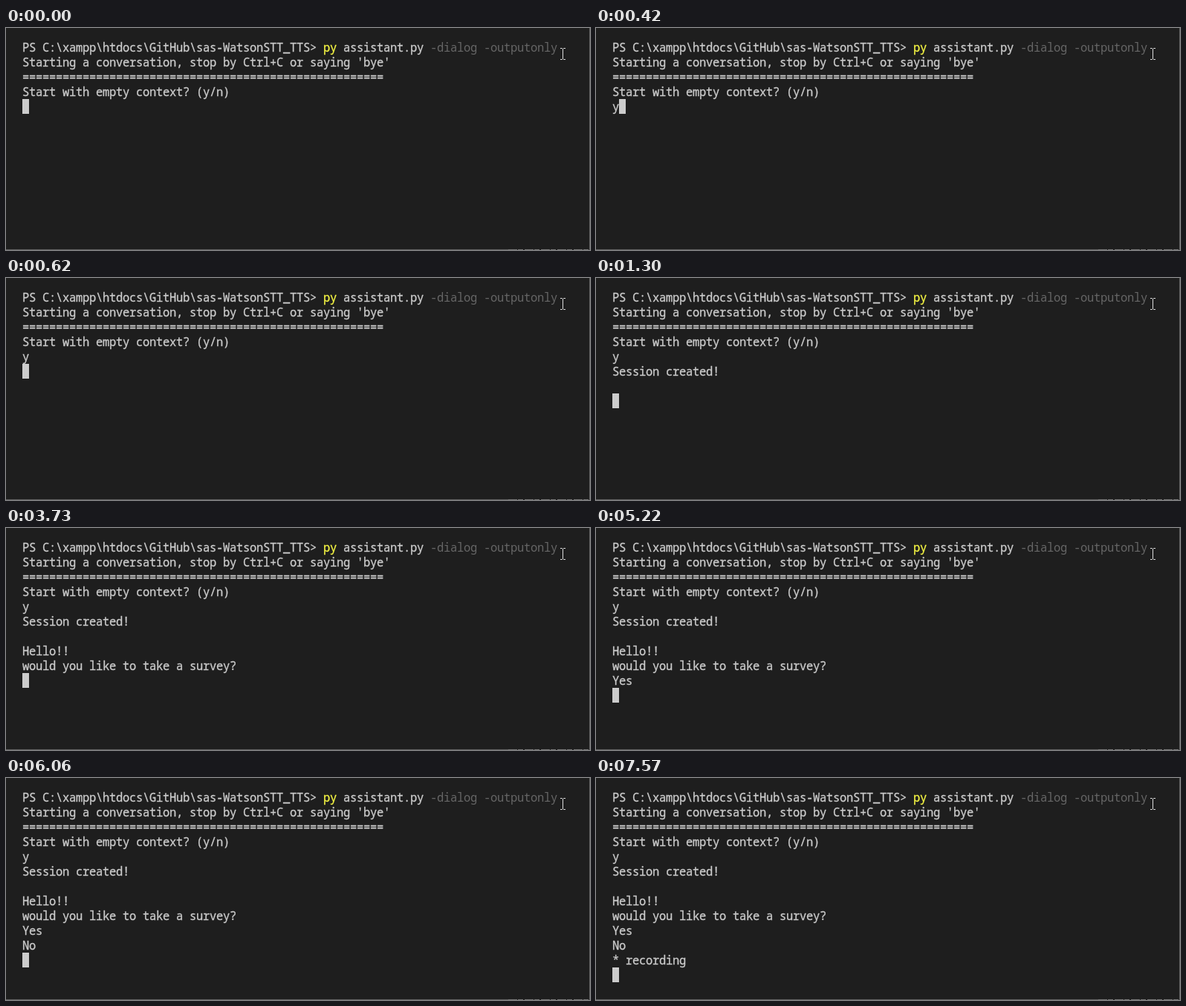
These frames come from a looping animation (786x300 px, 8000 ms). An HTML page:

```html
<!DOCTYPE html>
<html lang="en">
<meta charset="utf-8">
<title>Terminal session</title>
<style>
  html, body { margin: 0; width: 100%; height: 100%; overflow: hidden; background: #1e1e1e; }
  #stage { position: relative; width: 786px; height: 300px; overflow: hidden; }
  pre {
    position: absolute; left: 22px; top: 16px; margin: 0; color: #ccc;
    font: 15.5px/20px "Noto Sans Mono", "DejaVu Sans Mono", monospace;
    letter-spacing: -.3px; -webkit-text-stroke: .3px;
    font-variant-ligatures: none;
  }
  b { color: #f5f543; font-weight: 500; }
  i { color: #666; font-style: normal; -webkit-text-stroke: 0; }
  #caret { position: absolute; width: 9px; height: 20px; background: #ccc; }
  svg { position: absolute; left: 0; top: 0; }
</style>
<div id="stage">
  <pre>PS C:\xampp\htdocs\GitHub\sas-WatsonSTT_TTS&gt; <b>py</b> assistant.py <i>-dialog -outputonly</i>
Starting a conversation, stop by Ctrl+C or saying 'bye'
======================================================
Start with empty context? (y/n)
<span id="output"></span></pre>
  <div id="caret"></div>
  <svg width="786" height="300" fill="none">
    <path d="M785.5 0V300M0 299.5H676" stroke="#606060"/>
    <path d="M676 299.5H786" stroke="#777" stroke-dasharray="12 1 7 2"/>
    <path d="M746 27.5h2.5l1 1 1-1H753M749.5 28v14M746 42.5h2.5l1-1 1 1H753" stroke="#ddd"/>
  </svg>
</div>
<script>
  const LOOP = 8000, CELL = 9, LINE = 20, LEFT = 22, TOP = 96;
  const steps = [
    [420, "y"],
    [620, "\n"],
    [1300, "Session created!\n\n"],
    [1440, "Hello!!\n"],
    [3730, "would you like to take a survey?\n"],
    [5220, "Yes\n"],
    [6060, "No\n"],
    [7570, "* recording\n"]
  ];
  const output = document.getElementById("output");
  const caret = document.getElementById("caret");

  function draw() {
    const time = performance.now() % LOOP;
    const text = steps.filter(([start]) => time >= start).map(step => step[1]).join("");
    const lines = text.split("\n");
    output.textContent = text;
    caret.style.left = LEFT + lines.at(-1).length * CELL + "px";
    caret.style.top = TOP + (lines.length - 1) * LINE + "px";
    requestAnimationFrame(draw);
  }
  draw();
</script>
</html>
```
